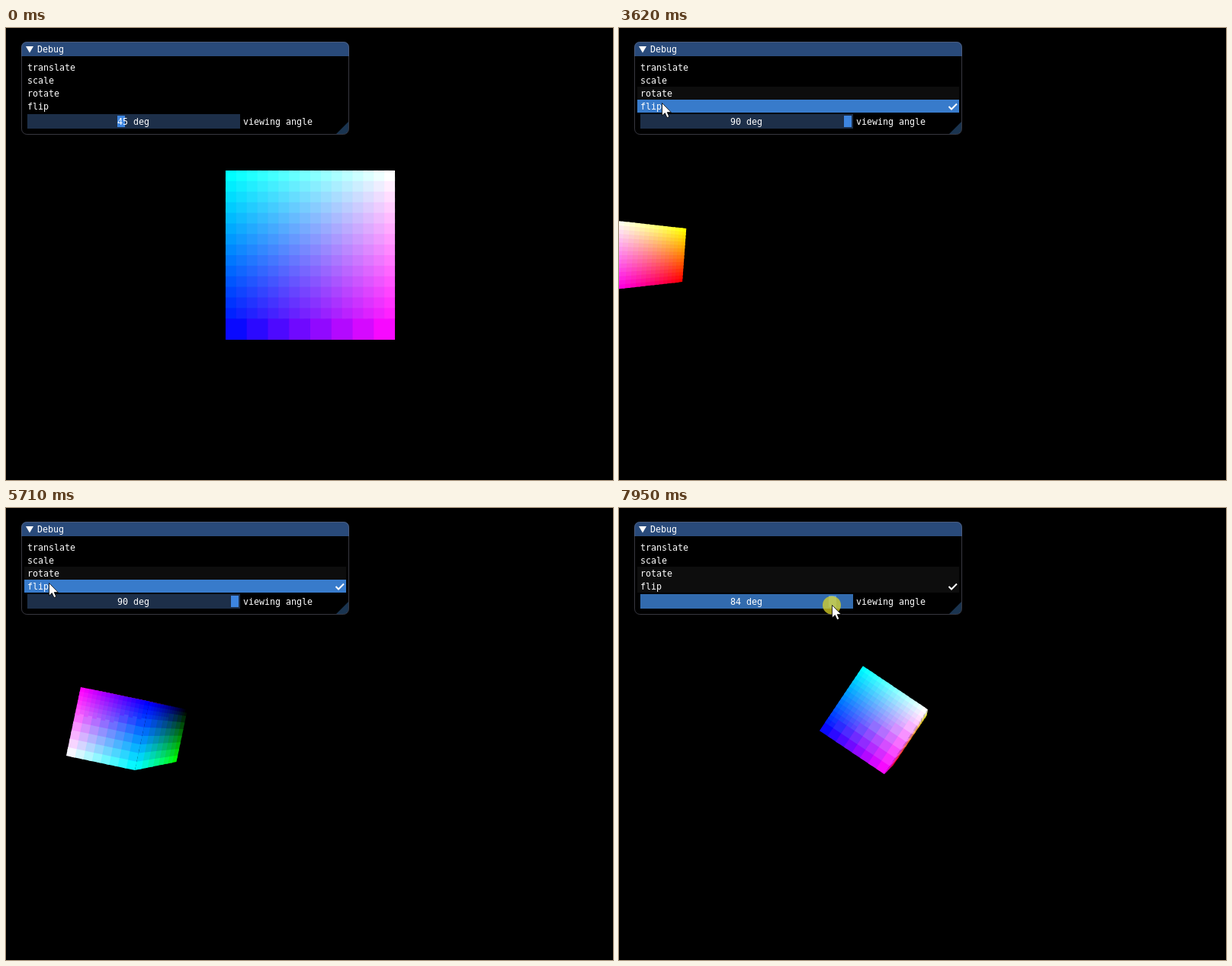
Write an HTML page with a canvas that moves like this. It is 796 by 593 pixels and loops after 8 s.

```html
<!DOCTYPE html>
<html lang="en">
<head>
<meta charset="utf-8">
<title>Rolling colour cube</title>
<style>
  html, body { margin: 0; width: 100%; height: 100%; overflow: hidden; background: #000; }
  canvas, svg { position: absolute; left: 0; top: 0; display: block; }
  text { font: 11.63px "DejaVu Sans Mono", "Liberation Mono", monospace; fill: #fff; white-space: pre; }
</style>
</head>
<body>
<canvas id="view" width="796" height="593"></canvas>
<svg width="796" height="593" viewBox="0 0 796 593">
  <path d="M20 37V25a7 7 0 0 1 7-7H443a7 7 0 0 1 7 7V37Z" fill="#294a7a"/>
  <path d="M449 123V133a6 6 0 0 1-6 6H433Z" fill="#1a3450"/>
  <rect x="20.5" y="18.5" width="429" height="121" rx="7" fill="none" stroke="#6e6e80" stroke-opacity=".5"/>
  <path d="M26 24H36L31 32.5Z" fill="#fff"/>
  <rect id="rotateRow" x="24" y="77" width="422" height="17"/>
  <rect id="flipRow" x="24" y="94" width="422" height="17"/>
  <path id="check" d="M432.5 103L436 106.5L443 99.5" fill="none" stroke="#fff" stroke-width="2"/>
  <rect id="slider" x="28" y="113" width="279" height="19"/>
  <rect id="grab" y="115" width="10" height="15"/>
  <text x="41" y="32">Debug</text>
  <text x="28" y="56">translate</text>
  <text x="28" y="73">scale</text>
  <text x="28" y="90">rotate</text>
  <text x="28" y="107">flip</text>
  <text id="value" x="146" y="127">45 deg</text>
  <text x="311" y="127">viewing angle</text>
  <g id="pointer">
    <circle id="press" r="12" cy=".5" fill="#dcd428" fill-opacity=".75"/>
    <path d="M.5 .5V17L4.3 13.6L7 19.6L9.8 18.4L7.2 12.6H12.3Z" fill="#fff" stroke="#000" stroke-width=".8"/>
  </g>
</svg>
<script>
const LOOP = 8000, FIRST = 290, TICK = 77.3;
const CENTER = [399, 298], FOCAL = 296.5, EYE = 7.446;
const FLIP_START = 3530;

// [ms, x, y]
const POINTER = [
  [290, 605, 530], [670, 336, 283], [1060, 156, 117], [1130, 155, 117], [1295, 155, 117],
  [1372, 148, 118], [1600, 174, 123], [1836, 214, 128], [2068, 267, 130], [2220, 302, 131],
  [2600, 331, 131], [2918, 322, 131], [2995, 150, 105], [3073, 60, 85], [3230, 60, 85],
  [3305, 57, 100], [3382, 56, 98], [6860, 56, 98], [7479, 300, 126], [7600, 300, 126],
  [7943, 279, 127]
];
// [ms, rolled degrees]
const ROLL = [[3568, 0], [4541, 90], [5701, 191.9], [6860, 295.2], [7943, 393.9]];
// [ms, share of the cube's height that has small cells]
const DETAIL = [[1295, .875], [1836, .74], [3500, .7], [3614, 1], [4541, .37], [6860, .36], [7943, .55]];

const $ = id => document.getElementById(id);
const ctx = $("view").getContext("2d");
const within = (t, a, b) => t >= a && t < b;
const clamp = (v, lo, hi) => Math.max(lo, Math.min(hi, v));

function track(keys, t) {
  if (t <= keys[0][0]) return keys[0].slice(1);
  const i = keys.findIndex(k => k[0] > t);
  if (i < 0) return keys[keys.length - 1].slice(1);
  const a = keys[i - 1], b = keys[i];
  const f = (t - a[0]) / (b[0] - a[0]);
  return a.slice(1).map((v, n) => v + (b[n + 1] - v) * f);
}

function viewAngle(t) {
  if (t < 1290) return 45;
  if (within(t, 2900, 7600)) return 90;
  const [x] = track(POINTER, t - 15);
  return clamp(10 + (x - 35) / 3.3125, 10, 90);
}

// The cube tips over its lower right edge, one quarter turn after another.
function cubePose(t) {
  if (t < FLIP_START) return { x: 0, y: 0, turn: 0 };
  const deg = track(ROLL, t)[0];
  const quarter = Math.floor(deg / 90);
  const a = (deg - quarter * 90) * Math.PI / 180;
  return {
    x: -10 + 2 * quarter + 1 - Math.cos(a) + Math.sin(a),
    y: Math.cos(a) + Math.sin(a) - 1,
    turn: deg * Math.PI / 180
  };
}

function projector(pose, angle) {
  const zoom = FOCAL / Math.tan(angle * Math.PI / 360);
  const c = Math.cos(pose.turn), s = Math.sin(pose.turn);
  return ([x, y, z]) => {
    const k = zoom / (EYE - z);
    return [
      CENTER[0] + k * (pose.x + x * c + y * s),
      CENTER[1] - k * (pose.y - x * s + y * c)
    ];
  };
}

function drawFace(axis, side, project, split) {
  const ua = (axis + 1) % 3, va = (axis + 2) % 3;
  const point = (u, v) => {
    const p = [];
    p[axis] = side;
    p[ua] = 2 * u - 1;
    p[va] = 2 * v - 1;
    return p;
  };
  const at = (u, v) => project(point(u, v));
  const o = at(0, 0), pu = at(1, 0), pv = at(0, 1);
  const area = (pu[0] - o[0]) * (pv[1] - o[1]) - (pu[1] - o[1]) * (pv[0] - o[0]);
  if (area * side >= 0) return;

  // Cells overlap the next ones so that no seams show.
  const cell = (i, j, n) => {
    const u = i / n, v = j / n;
    const u2 = Math.min(1, (i + 1.4) / n), v2 = Math.min(1, (j + 1.4) / n);
    const level = k => Math.round(n === 16 ? k * 17 : (k * 2 + .5) * 17);
    const rgb = [];
    rgb[axis] = side > 0 ? 255 : 0;
    rgb[ua] = level(i);
    rgb[va] = level(j);
    ctx.fillStyle = `rgb(${rgb})`;
    ctx.beginPath();
    for (const q of [at(u, v), at(u2, v), at(u2, v2), at(u, v2)]) ctx.lineTo(q[0], q[1]);
    ctx.fill();
  };
  const coarse = (i, j) => at(((i >> 1) + .5) / 8, ((j >> 1) + .5) / 8)[1] > split;

  for (let i = 0; i < 16; i++) {
    for (let j = 0; j < 16; j++) {
      if (!coarse(i, j)) cell(i, j, 16);
      else if (i % 2 === 0 && j % 2 === 0) cell(i / 2, j / 2, 8);
    }
  }
}

function drawCube(t, angle) {
  const project = projector(cubePose(t), angle);
  const ys = [];
  for (let n = 0; n < 8; n++) {
    ys.push(project([n & 1 ? 1 : -1, n & 2 ? 1 : -1, n & 4 ? 1 : -1])[1]);
  }
  const top = Math.min(...ys), bottom = Math.max(...ys);
  const split = top + (bottom - top) * track(DETAIL, t)[0];
  ctx.clearRect(0, 0, 796, 593);
  for (const axis of [0, 1, 2]) {
    for (const side of [-1, 1]) drawFace(axis, side, project, split);
  }
}

function rowFill(t, enter, leave) {
  if (t < enter) return "none";
  return t < leave ? "#387bcb" : "#0d0d0d";
}

function drawPanel(t, angle) {
  const pressed = within(t, 1290, 2900) || t >= 7600;
  $("slider").setAttribute("fill", pressed ? "#326bae" : "#1d2f49");
  $("grab").setAttribute("fill", pressed ? "#4f95ea" : "#3d85e0");
  $("grab").setAttribute("x", Math.round(30 + (angle - 10) * 3.3125));
  $("value").textContent = Math.round(angle) + " deg";
  $("rotateRow").setAttribute("fill", rowFill(t, 3060, 3295));
  $("flipRow").setAttribute("fill", rowFill(t, 3295, 7010));
  $("check").style.display = t >= FLIP_START ? "" : "none";

  const [x, y] = track(POINTER, t);
  $("pointer").style.display = t >= FIRST ? "" : "none";
  $("pointer").setAttribute("transform", `translate(${Math.round(x)} ${Math.round(y)})`);
  $("press").style.display = pressed ? "" : "none";
}

function stepTime(ms) {
  const k = Math.floor((ms - FIRST + 2) / TICK);
  return k < 0 ? 0 : FIRST + k * TICK;
}

let shown = -1;
function frame() {
  const t = stepTime(performance.now() % LOOP);
  if (t !== shown) {
    shown = t;
    const angle = viewAngle(t);
    drawCube(t, angle);
    drawPanel(t, angle);
  }
  requestAnimationFrame(frame);
}
frame();
</script>
</body>
</html>
```
